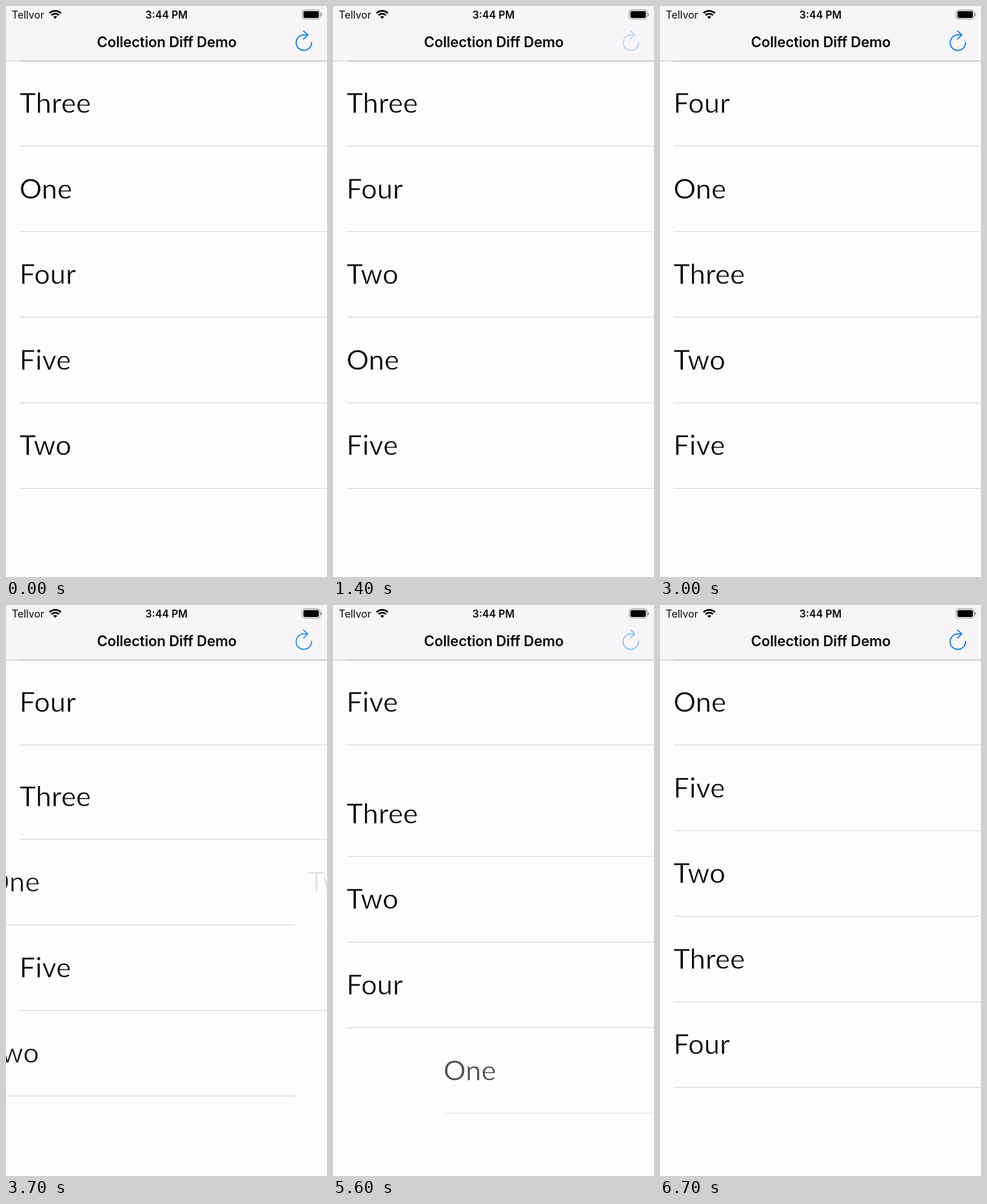
An HTML page for the animation above (6.8 s loop, 561 px wide and 998 px high).

```html
<!DOCTYPE html>
<html lang="en">
<head>
<meta charset="utf-8">
<title>Collection Diff Demo</title>
<style>
  html, body { margin: 0; width: 100%; height: 100%; overflow: hidden; background: #fefcff; }
  svg { display: block; width: 100%; height: 100%; }
  .ui { font-family: Inter, Roboto, sans-serif; }
  /* the background-coloured outline thins the strokes */
  #rows text {
    font: 400 49px Lato, "Open Sans", sans-serif; letter-spacing: .1px;
    font-variant-ligatures: none; fill: #050507; stroke: #fefcff; stroke-width: .8;
  }
</style>
</head>
<body>
<svg viewBox="0 0 561 998">
  <rect width="561" height="998" fill="#fefcff"/>
  <g id="rows"></g>
  <rect width="561" height="96" fill="#f7f5f8"/>
  <path d="M0 96.2H24" stroke="#d0cfd3" stroke-width="1.4"/>
  <path d="M24 96.2H561" stroke="#b9b8bc" stroke-width="1.4"/>
  <g class="ui" fill="#0a0a0c">
    <text x="10" y="21.5" font-size="18">Tellvor</text>
    <text x="280.5" y="21.5" font-size="18" font-weight="600" text-anchor="middle">3:44 PM</text>
    <text x="281" y="71.5" font-size="25" font-weight="600" letter-spacing="-.2" text-anchor="middle">Collection Diff Demo</text>
  </g>
  <g fill="none" stroke="#000" stroke-width="3">
    <path d="M76.1 12.6A14 14 0 0 1 95.9 12.6M79.6 16.1A9 9 0 0 1 92.4 16.1"/>
    <path d="M86 22.5l-3.4-3.4a4.8 4.8 0 0 1 6.8 0z" fill="#000" stroke="none"/>
  </g>
  <rect x="517.5" y="6.8" width="31.5" height="16.2" rx="4.6" fill="none" stroke="#8c8b8f" stroke-width="1.2"/>
  <rect x="519.8" y="8.9" width="27" height="12" rx="2.8"/>
  <path d="M550.4 12a3.2 3.2 0 0 1 0 6z" fill="#8c8b8f"/>
  <path id="reload" d="M534 62.6A13.5 13.5 0 1 1 520.4 50.6H527.4M519.5 43.2L527.4 50.6L519.5 58.2"
        fill="none" stroke="#0a7af5" stroke-width="2"/>
</svg>
<script>
const LOOP = 6800, SLIDE = 370, FADE = 400;
const WIDTH = 561, TOP = 95.2, PITCH = 149.6;

const split = s => s.split(' ');
const first = split('Three One Four Five Two');
// touch down, touch up, new order, rows that are not removed
const steps = [
  [500, 685, 'Three Four Two One Five', 'Three Four Two'],
  [1400, 1585, 'Four Two Three One Five', 'Four Two One Five'],
  [2400, 2480, 'Four One Three Two Five', 'Four Three Five'],
  [3300, 3413, 'Four Three One Five Two', 'Four Three Five'],
  [4250, 4300, 'Five Three Two Four One', 'Three Two'],
  [5200, 5460, 'Five One Three Two Four', 'Five Three Two Four'],
  [6200, 6259, 'One Five Two Three Four', 'One Two Four']
].map(([down, up, list, keep]) => ({ down, up, list: split(list), keep: split(keep) }));

const rows = document.getElementById('rows');
const reload = document.getElementById('reload');
const mix = (a, b, p) => a + (b - a) * p;

// cubic-bezier(.42, 0, .58, 1)
function ease(t) {
  if (t <= 0) return 0;
  if (t >= 1) return 1;
  let lo = 0, hi = 1, s;
  for (let i = 0; i < 24; i++) {
    s = (lo + hi) / 2;
    const x = 1.26 * s * (1 - s) ** 2 + 1.74 * s * s * (1 - s) + s ** 3;
    if (x < t) lo = s; else hi = s;
  }
  return s * s * (3 - 2 * s);
}

function cell(word, row, x = 0, alpha = 1) {
  return `<g transform="translate(${x} ${TOP + row * PITCH})" opacity="${alpha}">
    <rect y="1" width="${WIDTH}" height="${PITCH}" fill="#fefcff"/>
    <text x="23.5" y="91.8">${word}</text>
    <path d="M24 ${PITCH}H${WIDTH}" stroke="#dbdade" stroke-width="1.5"/></g>`;
}

// Where a row sits in the other list: it follows the nearest kept row above it.
function slot(word, from, to, keep) {
  const i = from.indexOf(word);
  let j = i;
  while (j >= 0 && !keep.includes(from[j])) j--;
  return i - j + to.indexOf(from[j]);
}

function transition(old, { list, keep }, p) {
  const gone = old.filter(w => !keep.includes(w));
  const added = list.filter(w => !keep.includes(w));
  return [
    ...gone.map(w => cell(w, mix(old.indexOf(w), slot(w, old, list, keep), p), WIDTH * p, 1 - p)),
    ...added.map(w => cell(w, mix(slot(w, list, old, keep), list.indexOf(w), p), WIDTH * (p - 1), p)),
    ...keep.map(w => cell(w, mix(old.indexOf(w), list.indexOf(w), p)))
  ].join('');
}

function draw(now) {
  const t = now % LOOP;
  const n = steps.filter(s => t >= s.down).length - 1;
  const step = steps[n];
  const old = n > 0 ? steps[n - 1].list : first;
  const p = step ? ease((t - step.up) / SLIDE) : 0;
  rows.innerHTML = p > 0 && p < 1
    ? transition(old, step, p)
    : (p ? step.list : old).map((w, i) => cell(w, i)).join('');
  reload.setAttribute('opacity', step ? mix(.25, 1, ease((t - step.up) / FADE)) : 1);
}

const start = performance.now();
function tick() {
  draw(performance.now() - start);
  requestAnimationFrame(tick);
}
tick();
</script>
</body>
</html>
```
